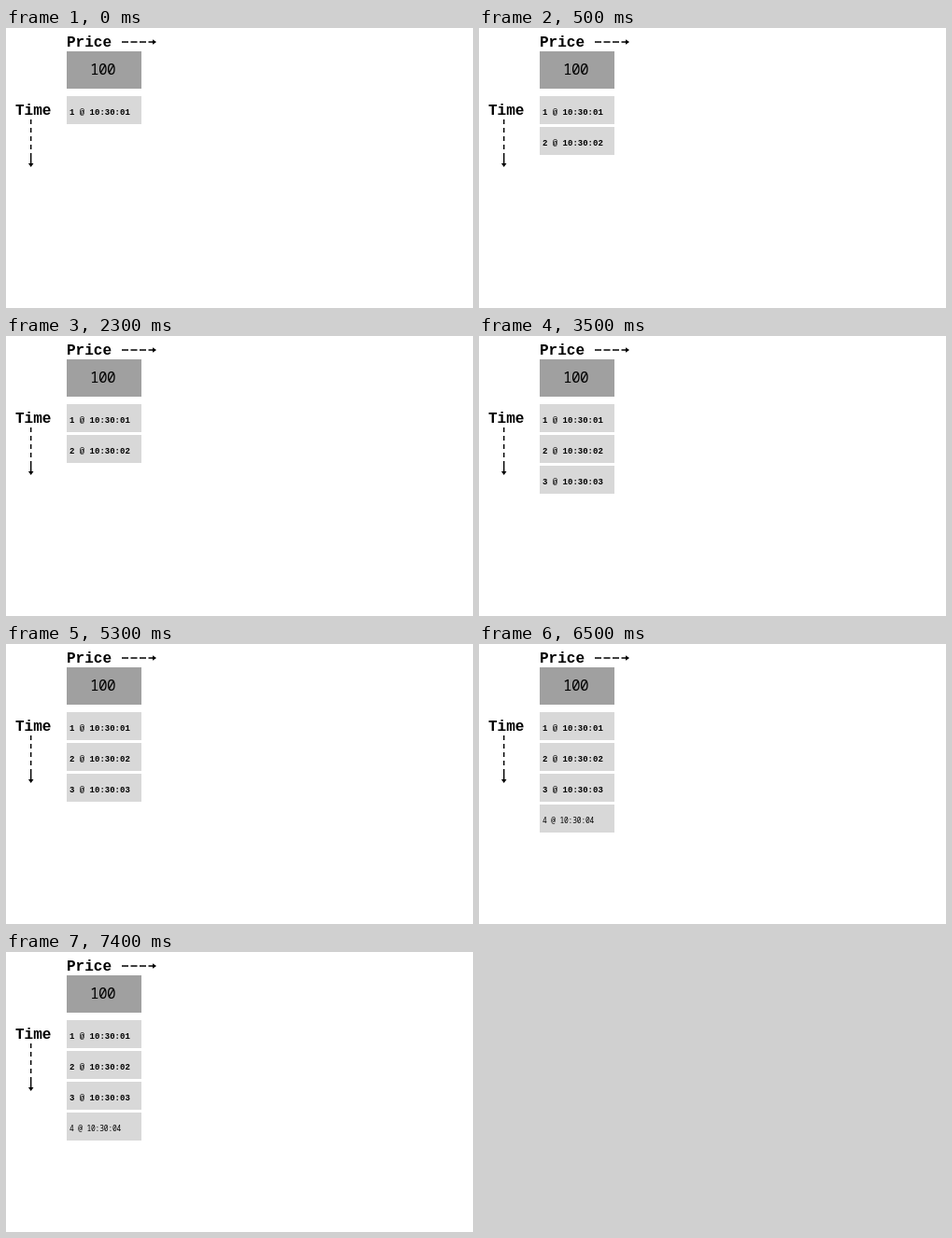
Animation of 500 by 300 pixels, one loop 8000 ms. Source, as an HTML page:

```html
<!DOCTYPE html>
<html lang="en">
<head>
<meta charset="utf-8">
<title>Price and time</title>
<style>
html, body { margin: 0; width: 100%; height: 100%; overflow: hidden; background: #fff; }
svg { display: block; width: 100vw; height: 100vh; }
text { fill: #000; }
.label { font: bold 16px "Liberation Mono", monospace; }
.price { font: 16px "Noto Sans Mono", monospace; letter-spacing: -.6px; }
.bold { font: bold 9px "Liberation Mono", monospace; }
.light { font: 8px "Noto Sans Mono", monospace; letter-spacing: -.2px; }
.arrow { fill: none; stroke: #000; stroke-width: 1.4; }
</style>
</head>
<body>
<svg viewBox="0 0 500 300">
  <text class="label" x="65" y="20">Price</text>
  <path class="arrow" d="M124 15h7M133.5 15h7M143 15h7M152.5 15h7"/>
  <path d="M161 15l-4 -2.8v5.6z"/>
  <text class="label" x="10" y="93">Time</text>
  <path class="arrow" d="M26.7 98v5M26.7 107v5M26.7 116v5M26.7 125v5M26.7 134v13"/>
  <path d="M26.7 149l-2.8 -4h5.6z"/>
  <rect x="65" y="25" width="80" height="40" fill="#a0a0a0"/>
  <text class="price" x="90" y="50">100</text>
  <g id="orders"></g>
</svg>
<script>
const NS = "http://www.w3.org/2000/svg";
const LOOP = 8000;
const starts = [0, 500, 3500, 6500];
const list = document.getElementById("orders");

function add(parent, tag, attrs) {
  const el = document.createElementNS(NS, tag);
  for (const key in attrs) el.setAttribute(key, attrs[key]);
  return parent.appendChild(el);
}

const orders = starts.map((start, i) => {
  const y = 73 + 33 * i;
  const g = add(list, "g", {});
  add(g, "rect", { x: 65, y, width: 80, height: 30, fill: "#d8d8d8" });
  const label = add(g, "text", { x: 68, y: y + 20, class: i < 3 ? "bold" : "light" });
  label.textContent = `${i + 1} @ 10:30:0${i + 1}`;
  return g;
});

function render(t) {
  orders.forEach((g, i) => g.setAttribute("visibility", t >= starts[i] ? "visible" : "hidden"));
}

function tick() {
  render(performance.now() % LOOP);
  requestAnimationFrame(tick);
}
tick();
</script>
</body>
</html>
```
